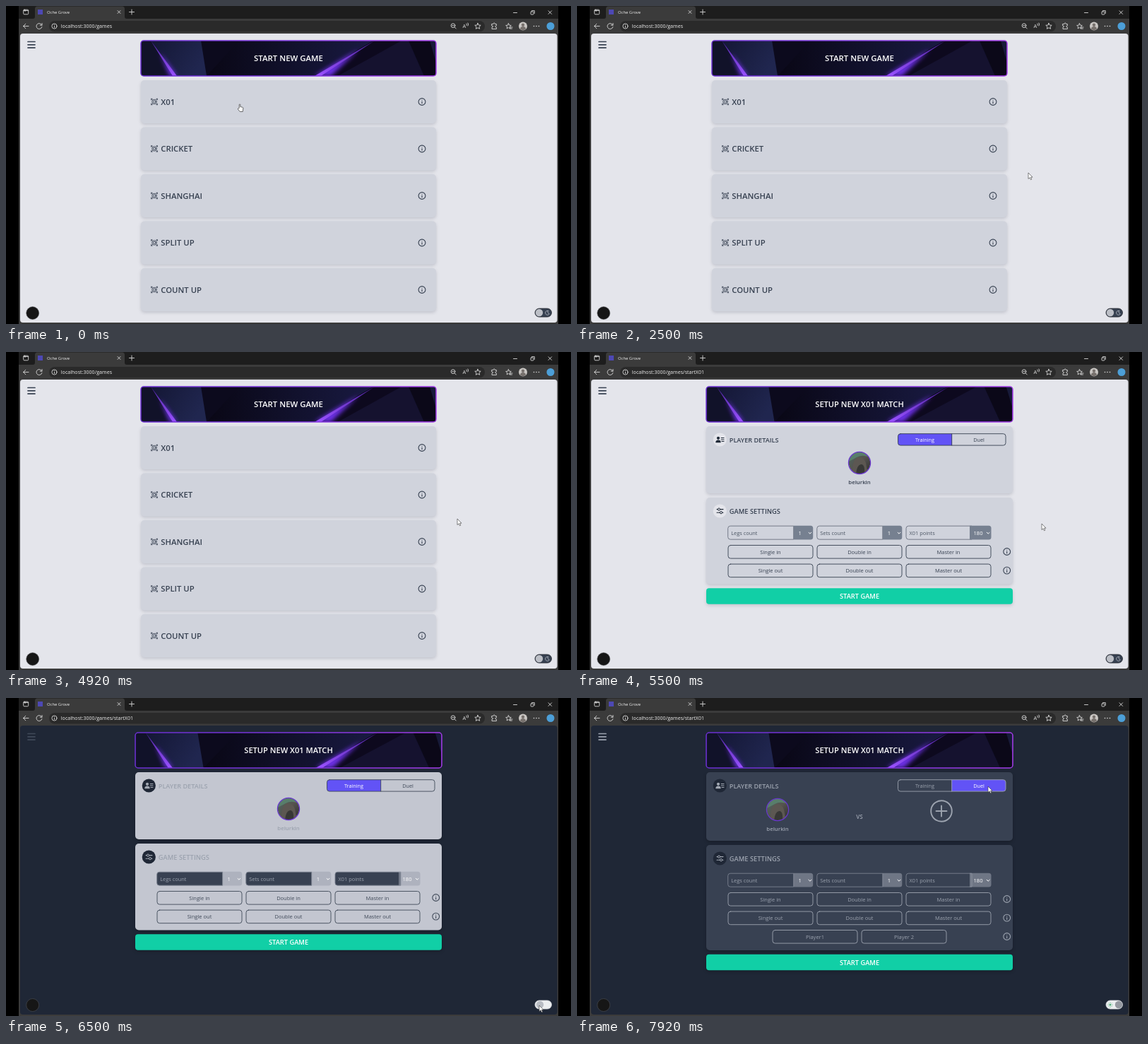
Recreate the animation shown at these times as an HTML page. Size 800x450 px, loop 8000 ms.

```html
<!DOCTYPE html>
<html lang="en">
<head>
<meta charset="utf-8">
<title>Oche Grove</title>
<style>
html, body { margin: 0; width: 100%; height: 100%; overflow: hidden; background: #000; }
svg { display: block; width: 800px; height: 450px; font-family: "Open Sans", "Noto Sans", sans-serif; }
.line { fill: none; stroke-linecap: round; stroke-linejoin: round; }
.chrome { stroke: #d6d6d6; stroke-width: .9; }
.card { fill: var(--card); filter: drop-shadow(0 2px 2px var(--shade)); }
.ink { fill: var(--ink); }
.title { fill: var(--title); font-weight: 600; }
.pen { stroke: var(--ink); }
.mark { stroke: var(--title); }
.mid { text-anchor: middle; }
</style>
</head>
<body>
<svg id="stage" viewBox="0 0 800 450"></svg>
<script>
const LOOP = 8000, SWITCH = 5170, DARK = 6470, FADE = 170, DUEL = 6920;
const stage = document.getElementById('stage');

const rect = (x, y, w, h, r, attr) =>
  `<rect x="${x}" y="${y}" width="${w}" height="${h}" rx="${r}" ${attr}/>`;
const circle = (x, y, r, attr) => `<circle cx="${x}" cy="${y}" r="${r}" ${attr}/>`;
const path = (d, attr) => `<path d="${d}" ${attr}/>`;
const line = (d, cls, width = 1) => path(d, `class="line ${cls}" stroke-width="${width}"`);
const text = (x, y, size, str, attr = 'class="ink"') =>
  `<text x="${x}" y="${y}" font-size="${size}" ${attr}>${str}</text>`;
const group = (id, body, attr = '') => `<g id="${id}" ${attr}>${body}</g>`;

const info = (x, y) =>
  circle(x, y, 4.9, 'class="line pen" stroke-width="1.1"') +
  line(`M${x} ${y - .3}v2.6M${x} ${y - 2.3}v.1`, 'pen', 1.1);

const defs = `<defs>
  <linearGradient id="edge"><stop stop-color="#6a2fd0"/><stop offset=".5" stop-color="#7b35dc"/><stop offset="1" stop-color="#a13be6"/></linearGradient>
  <linearGradient id="navy" x2="1" y2=".4"><stop stop-color="#141735"/><stop offset="1" stop-color="#20264f"/></linearGradient>
  <linearGradient id="dusk"><stop stop-color="#090715"/><stop offset="1" stop-color="#191a42"/></linearGradient>
  <linearGradient id="beam" x2="0" y2="1"><stop stop-color="#4c23a0"/><stop offset="1" stop-color="#9a52ff"/></linearGradient>
  <linearGradient id="fur" x2="1" y2="1"><stop stop-color="#4c6a62"/><stop offset=".5" stop-color="#55534f"/><stop offset="1" stop-color="#2b2c2d"/></linearGradient>
  <filter id="blur" x="-50%" y="-50%" width="200%" height="200%"><feGaussianBlur stdDeviation="3"/></filter>
  <clipPath id="bannerClip">${rect(191, 49, 418, 50, 4, '')}</clipPath>
  <clipPath id="faceClip">${circle(0, 0, 15.2, '')}</clipPath>
</defs>`;

const banner = (scale, label, size) => {
  const art =
    rect(191, 49, 418, 50, 0, 'fill="#0c0a1d"') +
    path('M191 49H205L240 99H191z', 'fill="#111229"') +
    path('M205 49H276L284 99H240z', 'fill="url(#navy)"') +
    path('M284 99L330 49H520L437 99z', 'fill="url(#dusk)"') +
    path('M437 99L520 49H570L592 99z', 'fill="#0d091e"') +
    path('M470 99L560 49H570L592 99z', 'fill="#15122f"') +
    path('M570 49H609V99H592z', 'fill="#171a39"') +
    path('M570 49H600L609 80V99H592z', 'fill="#0b0818"') +
    path('M218 66L242 99H232zM437 99L500 61L460 99z', 'fill="#7130ef" filter="url(#blur)"') +
    path('M205 49L236 99H242zM522 49L437 99H446z', 'fill="url(#beam)"');
  return `<g transform="translate(${400 * (1 - scale)} 0) scale(${scale} 1)">
    <g clip-path="url(#bannerClip)">${art}</g>
    ${rect(191, 49, 418, 50, 4, 'fill="none" stroke="url(#edge)" stroke-width="1.5"')}</g>` +
    text(400, 78.3, size, label, 'class="mid" fill="#fff" font-weight="600"');
};

const board = (x, y) =>
  circle(x, y, 3.3, 'class="line pen" stroke-width=".8"') +
  circle(x, y, 1.7, 'class="line pen" stroke-width=".8"') +
  [[-1, -1], [1, -1], [-1, 1], [1, 1]].map(([a, b]) =>
    line(`M${x + a * 2.6} ${y + b * 2.6}L${x + a * 4.4} ${y + b * 4.2}m${-a * 1.6} 0h${a * 1.6}v${-b * 1.6}`, 'pen', .8)).join('');

const games = () => banner(1, 'START NEW GAME', 11.4) +
  ['X01', 'CRICKET', 'SHANGHAI', 'SPLIT UP', 'COUNT UP'].map((name, i) => {
    const y = 105 + i * 66.5;
    return rect(191, y, 418, 61, 5, 'class="card"') + board(210, y + 30.5) +
      text(219.3, y + 34.7, 11.3, name, 'class="ink" font-weight="600"') + info(589, y + 30.5);
  }).join('');

const button = (x, y, label) =>
  rect(x, y, 120, 18.6, 3.5, 'class="line pen" stroke-width=".9"') +
  text(x + 60, y + 12.1, 7.5, label, 'class="ink mid"');

const field = (x, label, value) =>
  path(`M${x + 93} 246.2H${x + 3.5}q-3.5 0-3.5 3.5v12q0 3.5 3.5 3.5H${x + 93}z`, 'fill="var(--field)" stroke="var(--rim)" stroke-width=".9"') +
  path(`M${x + 93 - (value > 9 ? 3 : 0)} 245.8H${x + 117}q3.5 0 3.5 3.5v12.8q0 3.5-3.5 3.5H${x + 93 - (value > 9 ? 3 : 0)}z`, 'fill="var(--select)"') +
  text(x + 4.5, 258.5, 7.4, label, 'fill="var(--label)"') +
  text(x + (value > 9 ? 102 : 102), 258.8, 7.6, value, 'class="mid" fill="#fff"') +
  path(`M${x + 114.2} 255.2l2 2 2-2`, 'class="line" stroke="#fff"');

const badge = y => circle(202.3, y, 9.6, 'fill="var(--badge)"');

const avatar = group('avatar',
  `<g clip-path="url(#faceClip)">${circle(0, 0, 16, 'fill="url(#fur)"')}
   ${path('M-16 -16H16V-7Q5 -13 -4 -8T-16 -2z', 'fill="#587e6b"')}
   ${path('M-9 16Q-12 -2 -3 -8Q6 -9 9 0L12 16z', 'fill="#5c5752"')}
   ${path('M-5 16Q-4 3 2 2T7 16z', 'fill="#373736"')}</g>` +
  circle(0, 0, 15.6, 'fill="none" stroke="#6936cf" stroke-width="1.2"') +
  text(0, 30.2, 7.8, 'belurkin', 'class="title mid" style="fill:var(--name)"'));

const setup = () => {
  const rows = ['in', 'out'].map((end, i) => {
    const y = 273.5 + i * 26.6;
    return ['Single', 'Double', 'Master'].map((kind, j) => button(214 + j * 126, y, `${kind} ${end}`)).join('') +
      info(608.7, y + 9);
  }).join('');
  const details =
    rect(183, 105, 434, 95, 5, 'id="players" class="card"') + badge(124) +
    circle(200, 121.8, 2.1, 'fill="var(--glyph)"') +
    path('M196.3 128.2q0-3.6 3.7-3.6t3.7 3.6z', 'fill="var(--glyph)"') +
    path('M204.2 121.5h3.8M204.2 124h3.8M205 126.5h3', 'class="line" stroke="var(--glyph)" stroke-width="1.1"') +
    text(215.8, 127.8, 9.1, 'PLAYER DETAILS', 'class="title"') +
    path('M531 115.7H458q-3.5 0-3.5 3.5v9.4q0 3.5 3.5 3.5H531z', 'id="solo" fill="#6253f6"') +
    path('M530.5 115.7H603.5q3.5 0 3.5 3.5v9.4q0 3.5-3.5 3.5H530.5z', 'id="duel" fill="#6253f6"') +
    rect(454.5, 115.7, 152.5, 16.4, 3.5, 'class="line pen" stroke-width=".9"') +
    line('M530.7 116v16', 'pen', .9) +
    text(492.5, 126.7, 7.3, 'Training', 'id="soloText" class="mid"') +
    text(569, 126.7, 7.3, 'Duel', 'id="duelText" class="mid"') + avatar +
    group('versus', text(400, 171, 8, 'VS', 'class="title mid"') +
      circle(516, 160, 14.8, 'class="line mark" stroke-width="1.9"') +
      line('M508.5 160h15M516 152.5v15', 'mark', 1.9));
  const settings = rect(183, 206, 434, 122.5, 5, 'id="settings" class="card"') +
    group('rules', badge(225) +
      path('M198 222.6h1.2M203 222.6h4M198 227.2h4M206 227.2h1', 'class="line" stroke="var(--glyph)" stroke-width="1.1"') +
      circle(201, 222.6, 1.6, 'fill="none" stroke="var(--glyph)"') +
      circle(204, 227.2, 1.6, 'fill="none" stroke="var(--glyph)"') +
      text(215.8, 228.5, 9.3, 'GAME SETTINGS', 'class="title"') +
      field(213.7, 'Legs count', 1) + field(339.8, 'Sets count', 1) + field(466, 'X01 points', 180) + rows +
      group('order', button(277, 326.5, 'Player1') + button(403, 326.5, 'Player 2') + info(608.7, 335.5)));
  const start = group('start',
    rect(183, 334.2, 434, 22.6, 4, 'fill="#11cfa6" style="filter:drop-shadow(0 2px 2px var(--shade))"') +
    text(400, 349.3, 9.3, 'START GAME', 'class="mid" fill="#fff" font-weight="600"'));
  return banner(1.038, 'SETUP NEW X01 MATCH', 11.1) + details + settings + start;
};

const star = (x, y, r) => 'M' + Array.from({ length: 10 }, (_, i) => {
  const a = i * Math.PI / 5 - Math.PI / 2, d = i % 2 ? r * .48 : r;
  return (x + d * Math.cos(a)).toFixed(1) + ' ' + (y + d * Math.sin(a)).toFixed(1);
}).join('L') + 'z';

const browser = () => {
  const icon = d => line(d, 'chrome', .9);
  return rect(18, 0, 764, 450, 0, 'fill="#3b3b3b"') + rect(18, 0, 764, 18, 0, 'fill="#1d1d1d"') +
    path('M38 18q3 0 3-3V4q0-3.5 3.5-3.5H164.500q3.500 0 3.500 3.500V15q0 3 3 3z', 'fill="#3b3b3b"') +
    rect(24.7, 5.200, 7, 6.600, 1.200, 'class="line chrome"') + icon('M25 6.500h6.500M27 5.500v2') +
    rect(45, 5, 7, 7, 0, 'fill="#4d48b4"') +
    text(58, 11, 5.900, 'Oche Grove', 'fill="#eee"') +
    icon('M158 6.500l4 4m0-4l-4 4M174.500 8.500h7M178 5v7M718.500 9.500h5M768 6.800l4.600 4.600m0-4.600l-4.600 4.600') +
    rect(743, 8, 4, 4, .8, 'class="line chrome"') + icon('M744.500 6.600h3.800v3.800') +
    icon('M32 28.500h-7.500m3.300-3.300l-3.300 3.300 3.300 3.300M50.700 27a4 4 0 1 0 .2 2.600M51 24.500v2.700h-2.700') +
    rect(61, 21, 617, 15.500, 7.700, 'fill="#2a2a2a"') +
    circle(68.500, 28.500, 3.600, 'class="line chrome"') + icon('M68.500 28.300v2M68.500 26.600v.1') +
    text(77.800, 31.100, 7.100, '', 'id="url" fill="#eee"') +
    circle(633, 27.700, 2.900, 'class="line chrome"') + icon('M635.200 30l2 2M631.700 27.700h2.600') +
    text(646.500, 31.300, 7.500, 'A', 'fill="#d6d6d6"') + icon('M652 25q1 1 0 2.500M654 24q1.500 2 0 4') +
    icon(star(668, 28.700, 4.400)) +
    icon('M688 25.500h2q0-1.500 1.200-1.500t1.200 1.500h2v2.300q-1.600 0-1.600 1.200t1.600 1.200v2.300H688v-2.300q1.500 0 1.500-1.200t-1.500-1.200z') +
    icon(star(711.500, 28.700, 4)) + icon('M714 30h3M713.500 32h3') +
    circle(732, 28.500, 6, 'fill="#c9c6c3"') + circle(732, 26.700, 2.200, 'fill="#77716d"') +
    path('M728 32.500q0-3.500 4-3.500t4 3.500q-4 3.500-8 0z', 'fill="#77716d"') +
    [747.500, 751, 754.500].map(x => circle(x, 28.500, .8, 'fill="#ddd"')).join('') +
    circle(771, 28.500, 5.500, 'fill="#4c9fd8"');
};

const toggle = rect(749, 428, 23.5, 12, 6, 'fill="var(--track)" stroke="var(--trackRim)" stroke-width=".8"') +
  path('M767.500 431.300a3 3 0 1 0 1.800 4.300a2.800 2.800 0 0 1-1.800-4.300z', 'id="moon" class="line" stroke="#b9bec8" stroke-width=".8"') +
  group('sun', circle(755, 434.200, 1.400, 'fill="#4fae78"') +
    path('M755 431v.5M755 437v.5M751.800 434.200h.5M757.800 434.200h.5M752.800 432l.3.3M757 436.300l.3.3M752.800 436.400l.3-.3M757 432.200l.3-.3', 'class="line" stroke="#4fae78" stroke-width=".8"')) +
  circle(0, 434, 5.2, 'id="knob" fill="var(--knob)"');

const pointer = group('cursor',
  path('M0 0V8.600L2 6.800 3.400 9.800 4.800 9.200 3.500 6.200H6z', 'id="arrow" fill="#fff" stroke="#333" stroke-width=".6"') +
  path('M-.8 5.600V.7Q-.8 0 0 0T.8 .700V3.600L4 4.300Q5 4.700 4.800 6L4.200 10.500H.2L-2.600 7Q-2.600 5.500-1.600 5.600z', 'id="hand" fill="#fff" stroke="#333" stroke-width=".7"'));

stage.innerHTML = defs + browser() +
  rect(20, 39, 760.5, 409, 4, 'fill="var(--page)"') +
  line('M31 50.500h10M31 54.800h10M31 59.100h10', 'pen', 1.7) +
  group('games', games()) + group('setup', setup()) +
  circle(37.7, 434.5, 9, 'fill="#161616" stroke="#55565a" stroke-opacity=".6" stroke-width=".9"') + toggle + pointer;

const el = {};
stage.querySelectorAll('[id]').forEach(node => { el[node.id] = node; });

// time, x, y of the pointer tip
const route = [
  [0, 331, 139], [250, 331, 139], [750, 639, 236], [5420, 639, 236], [5500, 658, 243],
  [5830, 720, 340], [6170, 722, 342], [6330, 754, 430], [6420, 755, 435], [6510, 755, 435],
  [6670, 561, 152], [6830, 582, 125], [LOOP, 582, 125]
];
const clamp = v => Math.max(0, Math.min(1, v));
const smooth = v => { v = clamp(v); return v * v * (3 - 2 * v); };
const mix = (a, b, k) => `rgb(${a.map((v, i) => Math.round(v + (b[i] - v) * k))})`;
const show = (node, on) => node.setAttribute('visibility', on ? 'visible' : 'hidden');
const move = (node, x, y) => node.setAttribute('transform', `translate(${x} ${y})`);

function pointerAt(t) {
  const i = route.findIndex(p => p[0] > t);
  const [t0, x0, y0] = route[i - 1], [t1, x1, y1] = route[i];
  const k = smooth((t - t0) / (t1 - t0));
  return [x0 + (x1 - x0) * k, y0 + (y1 - y0) * k];
}

function theme(t) {
  const dark = t >= DARK, k = smooth((t - DARK) / FADE);
  const pick = (a, b) => dark ? b : a;
  const vars = {
    page: pick('#e4e5eb', '#1f2736'),
    card: mix([208, 211, 220], [56, 65, 82], k),
    ink: mix([55, 65, 81], [156, 163, 175], k),
    title: pick('#374151', '#9ca3af'),
    name: pick('#374151', '#9ca3af'),
    label: pick('#4b5563', '#9ca3af'),
    field: pick('#d0d3dc', '#384152'),
    rim: pick('#6b7280', '#7b8290'),
    select: pick('#768090', 'rgba(156,163,175,.55)'),
    badge: pick('#e4e5eb', '#1f2736'),
    glyph: pick('#1f2937', '#a3a9b4'),
    shade: pick('rgba(30,35,60,.17)', 'rgba(0,0,0,.22)'),
    track: pick('#374151', '#eceef0'),
    trackRim: pick('#25282e', '#d5d7dc'),
    knob: mix([188, 191, 198], [148, 152, 160], k)
  };
  for (const key in vars) stage.style.setProperty('--' + key, vars[key]);
  el.knob.setAttribute('cx', 755 + 12 * k);
  show(el.moon, !dark);
  show(el.sun, k > .6);
}

function draw(now) {
  const t = now % LOOP, onSetup = t >= SWITCH, duel = t >= DUEL;
  theme(t);
  el.games.style.display = onSetup ? 'none' : '';
  el.setup.style.display = onSetup ? '' : 'none';
  el.url.textContent = 'localhost:3000/games' + (onSetup ? '/startX01' : '');

  for (const id of ['versus', 'order']) el[id].style.display = duel ? '' : 'none';
  el.solo.style.display = duel ? 'none' : '';
  el.duel.style.display = duel ? '' : 'none';
  el.soloText.setAttribute('fill', duel ? 'var(--ink)' : '#fff');
  el.duelText.setAttribute('fill', duel ? '#fff' : 'var(--ink)');
  move(el.avatar, duel ? 284 : 400, duel ? 158 : 157);
  el.players.setAttribute('height', duel ? 97 : 95);
  el.settings.setAttribute('y', duel ? 208 : 206);
  el.settings.setAttribute('height', duel ? 149 : 122.5);
  move(el.rules, 0, duel ? 2 : 0);
  move(el.start, 0, duel ? 28.5 : 0);

  const [x, y] = pointerAt(t), hand = !onSetup && x < 609;
  move(el.cursor, x, y);
  show(el.hand, hand);
  show(el.arrow, !hand);
}

function tick() {
  draw(performance.now());
  requestAnimationFrame(tick);
}
tick();
</script>
</body>
</html>
```
